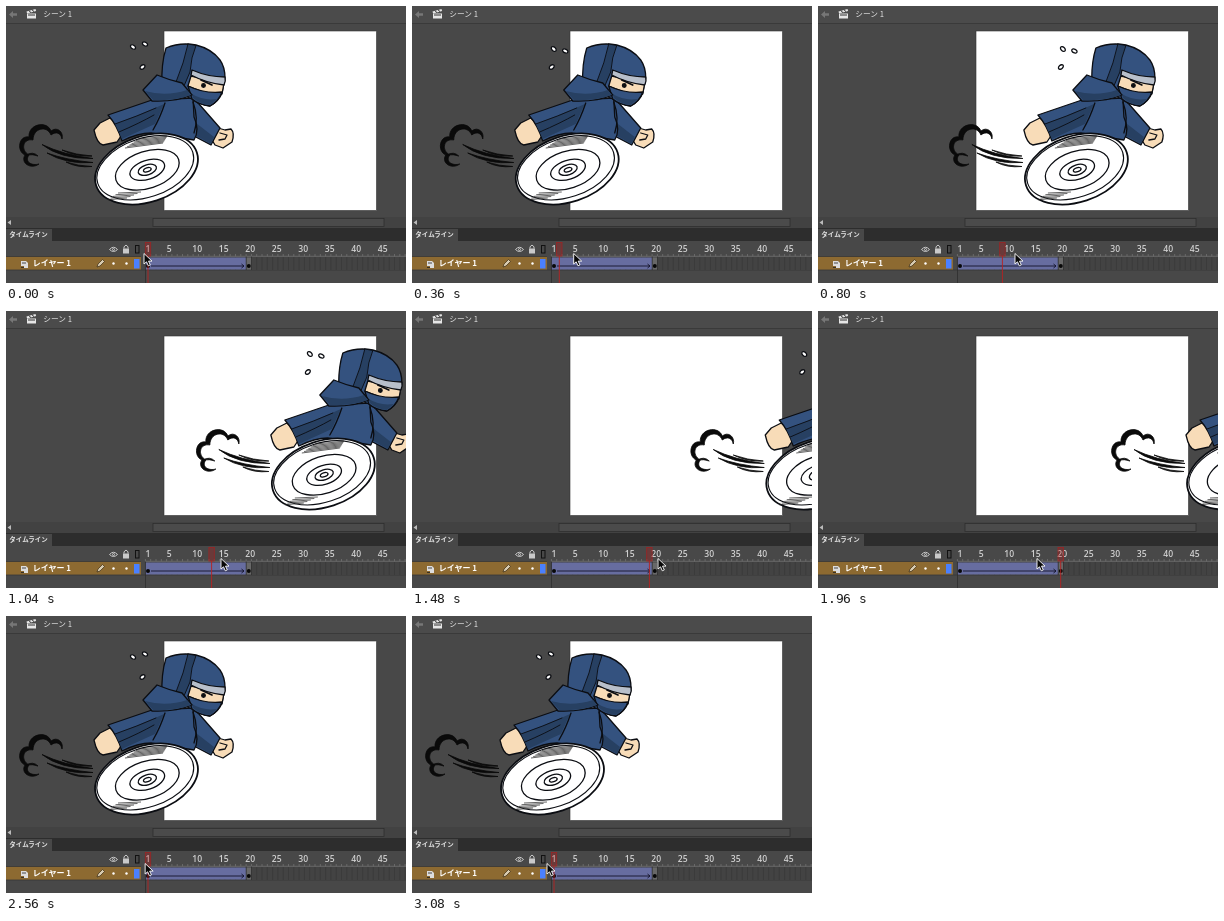
Animation, 400 px wide and 277 px high, one loop 3.12 s. Source, as an HTML page:

```html
<!DOCTYPE html>
<html lang="ja">
<head>
<meta charset="utf-8">
<style>
  html, body { margin: 0; width: 100%; height: 100%; overflow: hidden; background: #484848; }
  svg { display: block; width: 400px; height: 277px; }
  text { font-family: "Noto Sans CJK JP", "Noto Sans CJK", sans-serif; fill: #e6e6e6; }
  .ruler text { font: 600 8.6px "Open Sans", "Noto Sans", sans-serif; fill: #d2d2d2; text-anchor: middle; }
  .ink { stroke: #0b0d12; stroke-width: 1.3; stroke-linejoin: round; stroke-linecap: round; }
  .cloth { fill: #34527f; }
  .shade { fill: #274062; }
  .skin { fill: #f8dcb8; }
  .line { fill: none; }
  .flat { stroke: none; }
</style>
</head>
<body>
<svg viewBox="0 0 400 277">
  <!-- stage area -->
  <rect width="400" height="277" fill="#484848"/>
  <rect width="400" height="17" fill="#4b4b4b"/>
  <path d="M0 17.500H400" stroke="#3a3a3a"/>
  <path d="M3 8.500l4-3.500v2.300h4v2.400h-4v2.300z" fill="#777"/>
  <g fill="#e6e6e6">
    <path d="M21 7.500h9v5h-9z"/>
    <path d="M20.500 5.500l9-2.500.6 2-9 2.500z"/>
    <path d="M23 4.800l2 1.800M26 3.800l2 1.800M22 9h7" stroke="#333"/>
  </g>
  <text x="37.300" y="10.800" font-size="7.700">シーン 1</text>
  <rect x="158" y="25" width="212.500" height="179.500" fill="#fff" stroke="#333" stroke-width=".6"/>

  <g id="ninja">
    <!-- dust cloud and speed lines -->
    <g fill="#0a0a0a" stroke="#0a0a0a" stroke-width=".8" stroke-linejoin="round">
      <path d="M33 158C25 164 14 157 19 149C10 145 13 129 23 131C22 118 41 114 45 125C51 120 58 126 56 133C55 127 50 125 45 129C41 119 27 122 27 134C17 132 14 144 23 149C18 156 26 160 33 158z"/>
      <path d="M20 149Q27 145 32 150Q27 148 20 149z"/>
      <path d="M36 138.500Q58 149 87 152.500Q54 153 36 138.500z"/>
      <path d="M41 147Q60 154 87 156.500Q60 158.500 41 147z"/>
      <path d="M60 156Q72 160 86 160.500Q71 162 60 156z"/>
      <path d="M56 144Q70 149 86 150Q70 151 56 144z"/>
    </g>

    <!-- sweat -->
    <g class="ink" fill="#fff" id="sweat"></g>

    <g class="ink">
      <!-- far arm -->
      <path class="skin" d="M212 122L219 124L225 123Q229 127 226 136L217 142L209 139L206 134z"/>
      <path class="line" d="M214 127L221 129L219 133L213 134"/>
      <path class="cloth" d="M187 93L193 98L214 122L205 139L184 128z"/>
      <path class="shade flat" d="M190 117L208 131L205 138L187 128z"/>
      <!-- near arm and torso -->
      <path class="skin" d="M88 124L94 117L104 112Q112 118 115 130L111 136L97 139Q91 138 88 124z"/>
      <path class="cloth" d="M146 94L102 109Q111 119 116 135Q132 127 145 127L188 134Q194 124 188 111L187 92z"/>
      <path class="shade flat" d="M109 118Q130 110 149 102L158 98L149 118L116 133z"/>
      <path class="line" stroke-width=".9" d="M109 118Q132 110 150 102M113 126Q134 117 148 109"/>
      <path class="line" d="M159 97Q154 112 147 124M187 96Q193 112 188 127"/>
      <!-- hood -->
      <path class="cloth" d="M160 42Q174 36 190 39Q206 43 214 54Q219 61 219 72L216 87Q213 95 204 100Q194 99 186 93L156 80Q155 58 160 42z"/>
      <path class="shade" stroke-width=".9" d="M182 38L190 39.500Q185 51 184 66L178 80L170 76Q178 57 182 38z"/>
      <path class="skin" d="M185 70L218 77L216 88L200 87L182 80z"/>
      <path fill="#b8bfca" d="M186 64Q202 71 219 71Q220 75 218 79Q200 77 185 69z"/>
      <path class="cloth" d="M182 80Q199 88 216 86Q213 95 204 100Q193 99 186 93z"/>
      <path class="shade flat" d="M186 88Q197 95 211 93L204 99Q194 98 187 92z"/>
      <circle cx="197.500" cy="79.500" r="1.800" fill="#111"/>
      <path class="line" d="M195 74L206 79" stroke-width="1.700"/>
      <!-- scarf -->
      <path class="cloth" d="M137 84L151 69Q163 74 176 77L186 89Q170 96 146 95z"/>
      <path class="shade flat" d="M139 85Q160 91 181 84L185 89Q170 95 147 94z"/>
    </g>

    <!-- flying disc -->
    <g class="ink" fill="#fff" transform="translate(140.500 163) rotate(-18.200)">
      <ellipse rx="53" ry="33" stroke-width="1.800"/>
      <ellipse cx="-.8" cy="-1.500" rx="50" ry="29.500" stroke-width="1.100"/>
      <ellipse cx=".5" cy="1" rx="33" ry="18.500"/>
      <ellipse cx=".5" cy="1" rx="18" ry="9.500"/>
      <ellipse cx=".5" cy="1" rx="9.500" ry="5"/>
      <ellipse cx=".5" cy="1" rx="4" ry="2"/>
    </g>
    <path id="hatch" fill="none" stroke="#222" stroke-width=".7"/>
  </g>

  <!-- scroll bar and panel tab -->
  <rect y="211" width="400" height="11" fill="#424242"/>
  <rect x="147" y="212.500" width="231" height="8" fill="#4b4b4b" stroke="#2e2e2e" stroke-width=".8"/>
  <path d="M5 214v5l-3.500-2.500z" fill="#bbb"/>
  <rect y="222" width="400" height="13" fill="#2d2d2d"/>
  <rect y="223" width="46" height="13" fill="#484848"/>
  <text x="3.300" y="231.200" font-size="6.500" font-weight="700">タイムライン</text>

  <!-- timeline -->
  <rect y="235" width="400" height="42" fill="#484848"/>
  <g fill="none" stroke="#c9c9c9">
    <path d="M103.500 243.500Q107.500 239 111.500 243.500Q107.500 247.500 103.500 243.500z"/>
    <circle cx="107.500" cy="243.500" r="1"/>
    <path d="M118 242.500v-1.500q2-3.500 4 0v1.500"/>
    <rect x="117.500" y="243" width="5" height="4" fill="#c9c9c9"/>
    <rect x="129.500" y="239.500" width="3.500" height="7.500" stroke="#111"/>
  </g>
  <rect y="250.500" width="135" height="13.500" fill="#8d6a31"/>
  <path d="M0 250.500H135M0 264H400" stroke="#363636" stroke-width=".8"/>
  <path d="M15 255h5l2 2v5h-4v-2h-3z" fill="#ddd"/>
  <path d="M15 261.500h3M16 257h4" stroke="#222" stroke-width=".8"/>
  <text x="26.800" y="260.300" font-size="8" font-weight="700" style="fill:#fff">レイヤー 1</text>
  <path d="M91 261l1-3 4.500-4.500 2 2-4.500 4.500z" fill="#d8cbb0" stroke="#3b2c14" stroke-width=".7"/>
  <g fill="#fff"><circle cx="107.500" cy="257.500" r="1.200"/><circle cx="120.500" cy="257.500" r="1.200"/></g>
  <rect x="128" y="253" width="5.500" height="9.500" fill="#4a80ff"/>
  <rect x="139" y="250" width="261" height="14" fill="#434343"/>
  <path id="grid" stroke="#393939" stroke-width=".7"/>
  <path id="ticks" stroke="#777" stroke-width=".7"/>
  <g class="ruler" id="ruler"></g>
  <rect x="139.500" y="251.500" width="100.700" height="12" fill="#676da0"/>
  <rect x="240.200" y="251.500" width="5.300" height="12" fill="#686868"/>
  <path d="M139.500 250.500V277M240.200 250.500V264M245.500 250.500V264" stroke="#2b2b2b" stroke-width=".7"/>
  <path d="M145 260H238M235.500 258l2.500 2-2.500 2" fill="none" stroke="#14142a" stroke-width=".9"/>
  <circle cx="142" cy="260" r="2" fill="#080808"/>
  <circle cx="242.800" cy="260" r="2" fill="#080808"/>

  <g id="playhead">
    <rect x="-2.700" y="236.500" width="5.400" height="13.500" fill="#c01818" fill-opacity=".28" stroke="#9c2424" stroke-width=".8"/>
    <path d="M0 250V277" stroke="#b82222" stroke-width=".9"/>
  </g>
  <path id="cursor" d="M0 0V10.500L2.500 8.300L4.300 12.300L6.300 11.400L4.500 7.600H8z" fill="#080808" stroke="#fff" stroke-width=".9"/>
</svg>
<script>
  const LOOP = 3120, STEP = 40, LAG = 150;
  const FIRST_X = 142, CELL = 5.3, LAST = 19, TRAVEL = 280;
  const $ = id => document.getElementById(id);
  const range = (n, make) => Array.from({ length: n }, (_, i) => make(i)).join("");

  // mouse x over time: [ms, px]
  const mousePath = [[0, 138], [80, 138], [600, 182], [1040, 215], [1480, 246], [1640, 252],
    [1800, 246], [1960, 219], [2130, 184], [2170, 170], [2320, 148], [2520, 140],
    [2800, 134], [3080, 135]];

  // drops of sweat: [x, y, angle], at rest and in flight
  const restDrops = [[127, 41, 35], [139, 38, 30], [136.5, 61, -40]];
  const flightDrops = [[127, 43, 40], [138.5, 45, 25], [125, 61, -40]];

  function mouseX(t) {
    const i = mousePath.findIndex(([time]) => time > t);
    if (i < 0) return mousePath.at(-1)[1];
    if (i === 0) return mousePath[0][1];
    const [t0, x0] = mousePath[i - 1], [t1, x1] = mousePath[i];
    return x0 + (x1 - x0) * (t - t0) / (t1 - t0);
  }

  const edge = i => 139.4 + i * CELL;
  $("grid").setAttribute("d", range(50, i => `M${edge(i)} 250V264`));
  $("ticks").setAttribute("d", range(50, i => `M${edge(i)} 248V250.500`) + "M139 250.300H400");
  $("ruler").innerHTML = range(10, i => {
    const n = i ? i * 5 : 1;
    return `<text x="${FIRST_X + (n - 1) * CELL + (n > 9 ? 1.5 : 0)}" y="246.400">${n}</text>`;
  });
  $("hatch").setAttribute("d",
    range(7, i => `M${119 + i * 2.2} ${142 - i * 1.5}l${38 - i * 1.5} ${-5 + i * .4}`) +
    range(5, i => `M${112 - i * 2.5} ${187 + i * 1.7}l${23 - i} ${-1 - i * .2}`));

  const moveTo = (id, x, y) => $(id).setAttribute("transform", `translate(${x} ${y})`);

  const drop = ([x, y, angle]) =>
    `<ellipse rx="2.800" ry="1.800" transform="translate(${x} ${y}) rotate(${angle})"/>`;

  function draw(ms) {
    const t = Math.floor(ms % LOOP / STEP) * STEP;
    const raw = Math.floor((mouseX(t - LAG) - 139.4) / CELL);
    const cell = Math.max(0, Math.min(LAST, raw));
    $("sweat").innerHTML = (cell ? flightDrops : restDrops).map(drop).join("");
    moveTo("ninja", cell * TRAVEL / LAST, 0);
    moveTo("playhead", FIRST_X + cell * CELL, 0);
    moveTo("cursor", mouseX(t), 247.5);
  }

  const start = performance.now();
  function tick() {
    draw(performance.now() - start);
    requestAnimationFrame(tick);
  }
  tick();
</script>
</body>
</html>
```
